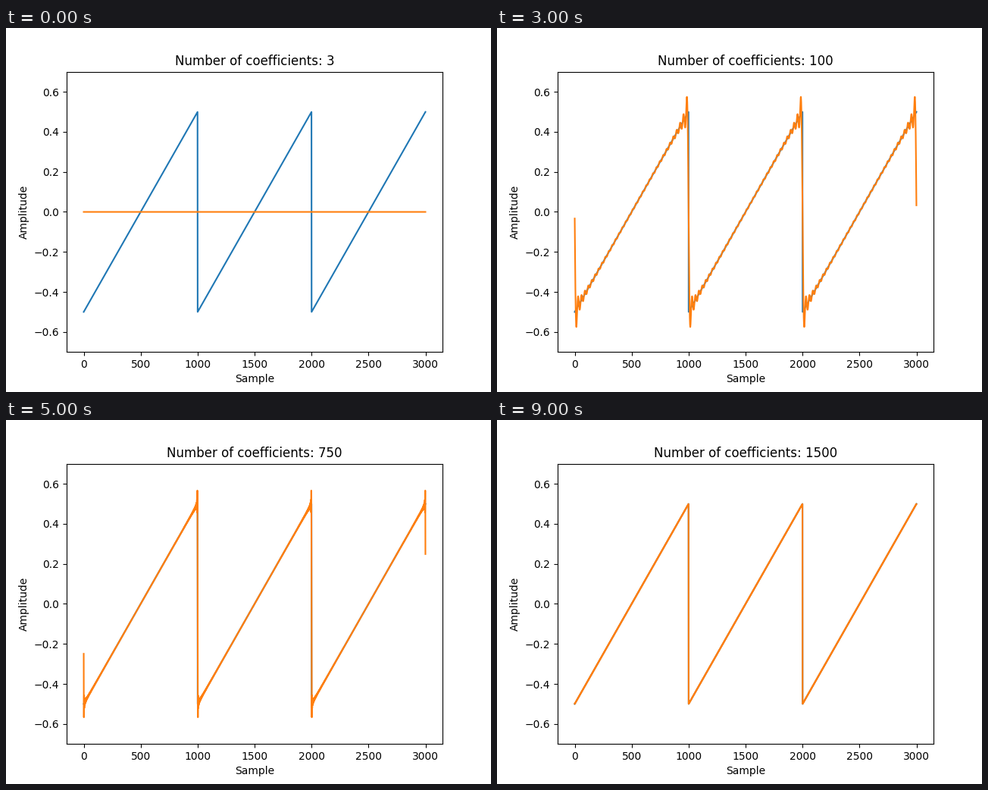
Animation, 640 px wide and 480 px high, one loop 10 s. Source, as a matplotlib script:

```python
import numpy as np
import matplotlib.pyplot as plt
from matplotlib.animation import FuncAnimation

PERIOD = 1000
SAMPLES = 3 * PERIOD
COUNTS = [3, 10, 25, 100, 500, 750, 1000, 1250, 1450, 1500]

x = np.arange(SAMPLES)
saw = (x % PERIOD) / PERIOD - 0.5
spectrum = np.fft.rfft(saw)


def rebuild(count):
    """Restore the wave from its lowest `count` Fourier coefficients."""
    kept = spectrum.copy()
    kept[count:] = 0
    return np.fft.irfft(kept, SAMPLES)


fig, ax = plt.subplots(figsize=(6.4, 4.8), dpi=100)
ax.plot(x, saw, color="#1f77b4")
approx, = ax.plot(x, rebuild(COUNTS[0]), color="#ff7f0e")
ax.set_ylim(-0.7, 0.7)
ax.set_xlabel("Sample")
ax.set_ylabel("Amplitude")


def draw(i):
    count = COUNTS[i]
    approx.set_ydata(rebuild(count))
    ax.set_title(f"Number of coefficients: {count}")
    return approx,


anim = FuncAnimation(fig, draw, frames=len(COUNTS), interval=1000,
                     repeat=True, repeat_delay=0, blit=False)
plt.show()
```
